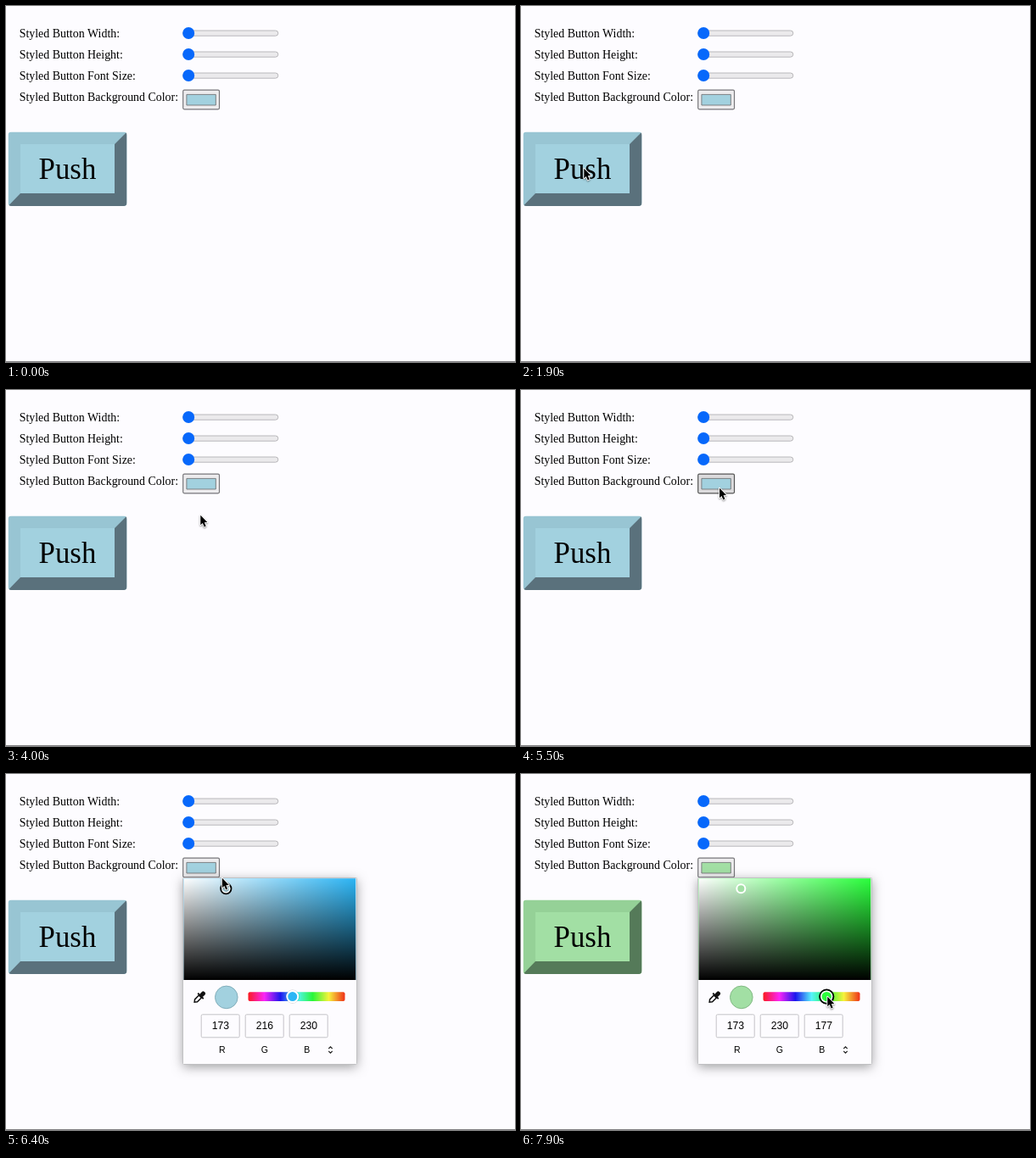
Recreate the animation shown at these times as an HTML page with a canvas. Size 600x420 px, loop 8000 ms.

```html
<!DOCTYPE html>
<html lang="en">
<head>
<meta charset="utf-8">
<title>Styled button</title>
<style>
  html, body { margin: 0; width: 100%; height: 100%; overflow: hidden; background: #fdfcff; }
  canvas { display: block; width: 600px; height: 420px; }
</style>
</head>
<body>
<canvas id="stage" width="600" height="420"></canvas>
<script>
const ctx = document.getElementById('stage').getContext('2d');
const LOOP = 8000, STEP = 100;
const APPEAR = 100, HOVER = 5000, OPEN = 5700, PICK = 7500;
const SERIF = '"Liberation Serif", "Times New Roman", serif';
const SANS = '"Liberation Sans", Arial, sans-serif';
const PAGE = '#fdfcff';

const BLUE = { fill: '#a2d1df', light: '#98c5d3', dark: '#5a717c', edge: '#83aebb',
               pure: '#2cb5f5', hue: 195, rgb: [173, 216, 230] };
const GREEN = { fill: '#a2dfa4', light: '#95d197', dark: '#557a59', edge: '#83b985',
                pure: '#2aff3c', hue: 124, rgb: [173, 230, 177] };

// Pointer tip: time, x, y
const PATH = [
  [100, 380, 185], [900, 92, 197], [1900, 73.5, 191], [3400, 73.5, 191],
  [4000, 228.5, 147], [4500, 229, 144], [5000, 233, 115], [6100, 233.5, 115],
  [6400, 254, 122], [7000, 363, 266], [7300, 360.5, 262], [8000, 360.5, 262]
];

function pointerAt(t) {
  let i = 1;
  while (i < PATH.length - 1 && t > PATH[i][0]) i++;
  const [t0, x0, y0] = PATH[i - 1], [t1, x1, y1] = PATH[i];
  const u = Math.min(1, Math.max(0, (t - t0) / (t1 - t0)));
  const e = u * u * (3 - 2 * u);
  return [x0 + (x1 - x0) * e, y0 + (y1 - y0) * e];
}

function paint(fill, stroke, width = 1) {
  if (fill) { ctx.fillStyle = fill; ctx.fill(); }
  if (stroke) { ctx.strokeStyle = stroke; ctx.lineWidth = width; ctx.stroke(); }
}

function box(x, y, w, h, r, fill, stroke, width) {
  ctx.beginPath();
  ctx.roundRect(x, y, w, h, r);
  paint(fill, stroke, width);
}

function circle(x, y, r, fill, stroke, width) {
  ctx.beginPath();
  ctx.arc(x, y, r, 0, Math.PI * 2);
  paint(fill, stroke, width);
}

function poly(points, fill, stroke, width, open) {
  ctx.beginPath();
  points.forEach(([x, y]) => ctx.lineTo(x, y));
  if (!open) ctx.closePath();
  paint(fill, stroke, width);
}

function text(str, x, y, size, family, align = 'left') {
  ctx.font = `${size}px ${family}`;
  ctx.textAlign = align;
  ctx.fillStyle = '#000';
  ctx.fillText(str, x, y);
}

function gradient(x0, y0, x1, y1, colors) {
  const g = ctx.createLinearGradient(x0, y0, x1, y1);
  colors.forEach((c, i) => g.addColorStop(i / (colors.length - 1), c));
  return g;
}

function drawForm(color, hover) {
  ['Width:', 'Height:', 'Font Size:', 'Background Color:'].forEach((label, i) => {
    text('Styled Button ' + label, 15.7, 36.8 + i * 25, 13.92, SERIF);
    if (i === 3) return;
    const y = 32 + i * 25;
    box(208.5, y - 3, 112.3, 6.2, 3.1, '#ebeaec', '#b3b2b5', 0.9);
    circle(215.2, y, 7, '#0768fb');
  });
  box(208.7, 99.2, 42.8, 22.6, 1.5, hover ? '#dcdbdd' : '#edecee', hover ? '#555' : '#77767a', 1.2);
  box(212.9, 104.4, 34.4, 12.6, 0, color.fill, '#727478', 0.9);
}

function drawButton(color) {
  const l = 2.5, t = 148.5, r = 142.5, b = 236, il = 17, it = 163, ir = 128, ib = 221;
  ctx.save();
  ctx.beginPath();
  ctx.roundRect(l, t, r - l, b - t, 4);
  ctx.clip();
  ctx.fillStyle = color.light;
  ctx.fillRect(l, t, r - l, b - t);
  poly([[r, t], [r, b], [l, b], [il, ib], [ir, ib], [ir, it]], color.dark);
  ctx.fillStyle = color.fill;
  ctx.fillRect(il, it, ir - il, ib - it);
  ctx.restore();
  text('Push', 38.6, 203.7, 34.8, SERIF);
}

function drawDropper() {
  ctx.save();
  ctx.translate(227.8, 263.6);
  ctx.rotate(Math.PI / 4);
  box(-2.5, -9, 5, 6.5, 2, '#111');
  box(-4.7, -3.4, 9.4, 2, 0.5, '#111');
  poly([[-2.1, -1.5], [-2.1, 5.3], [0, 8], [2.1, 5.3], [2.1, -1.5]], PAGE, '#111', 1.5);
  ctx.restore();
}

function drawPicker(color, hueFocused) {
  ctx.save();
  ctx.shadowColor = 'rgba(0,0,0,.38)';
  ctx.shadowBlur = 13;
  ctx.shadowOffsetY = 3;
  box(208.5, 122.5, 205, 220, 1, PAGE);
  ctx.restore();
  box(208.5, 122.5, 205, 220, 1, PAGE, '#bcbbbe', 0.9);

  const x = 209.5, y = 123.2, w = 202.8, h = 119.8;
  const layers = [
    color.pure,
    gradient(x, 0, x + w, 0, ['#fff', 'rgba(255,255,255,0)']),
    gradient(0, y, 0, y + h, ['rgba(0,0,0,0)', '#000'])
  ];
  for (const layer of layers) {
    ctx.fillStyle = layer;
    ctx.fillRect(x, y, w, h);
  }
  if (hueFocused) {
    circle(259.3, 135.2, 5, color.fill, '#fff', 2);
  } else {
    circle(259.3, 135.2, 6.1, color.fill, '#000', 2);
    circle(259.3, 135.2, 4.5, null, '#fff', 1.4);
  }

  drawDropper();
  circle(259.8, 263.4, 13.3, color.fill, color.edge, 1);

  box(285.5, 257.2, 114, 10.8, 2, gradient(285.5, 0, 399.5, 0,
    ['#fa1b20', '#fb25f6', '#1c16ee', '#57f4fb', '#28f63a', '#f6f23b', '#ef3018']));
  const hueX = 285.5 + 114 * (1 - color.hue / 360);
  if (hueFocused) {
    circle(hueX, 262.6, 8.1, color.pure, '#000', 2);
    circle(hueX, 262.6, 6.4, null, '#fff', 1.5);
  } else {
    circle(hueX, 262.6, 7.7, null, 'rgba(0,0,0,.15)', 1);
    circle(hueX, 262.6, 6.5, color.pure, '#fff', 2);
  }

  color.rgb.forEach((value, i) => {
    const left = 230.2 + i * 52;
    box(left, 283.8, 45, 27, 1.5, PAGE, '#c4c3c7', 1);
    text(value, left + 22.6, 301.4, 12.2, SANS, 'center');
    text('RGB'[i], 254.8 + i * 50, 329.3, 10.5, SANS, 'center');
  });
  poly([[380.3, 324], [382.5, 321.8], [384.7, 324]], null, '#222', 1.1, true);
  poly([[380.3, 327], [382.5, 329.2], [384.7, 327]], null, '#222', 1.1, true);
}

function drawPointer(x, y) {
  ctx.save();
  ctx.translate(x, y);
  ctx.lineJoin = 'round';
  ctx.shadowColor = 'rgba(0,0,0,.35)';
  ctx.shadowBlur = 2;
  ctx.shadowOffsetY = 1;
  const arrow = [[0.8, 0.8], [0.8, 12.2], [3.3, 9.9], [5.2, 14.4], [7.2, 13.5], [5.3, 9.2], [8.8, 9]];
  poly(arrow, '#fff', '#fff', 1.9);
  ctx.shadowColor = 'transparent';
  poly(arrow, '#000');
  ctx.restore();
}

function draw(t) {
  const picked = t >= PICK, open = t >= OPEN;
  const color = picked ? GREEN : BLUE;
  ctx.fillStyle = PAGE;
  ctx.fillRect(0, 0, 600, 420);
  ctx.fillStyle = '#828184';
  ctx.fillRect(0, 419, 600, 1);
  drawForm(color, t >= HOVER && !open);
  drawButton(color);
  if (open) drawPicker(color, picked);
  if (t >= APPEAR) drawPointer(...pointerAt(t));
}

const start = performance.now();
function tick() {
  const t = (performance.now() - start) % LOOP;
  draw(Math.floor(t / STEP) * STEP);
  requestAnimationFrame(tick);
}
tick();
</script>
</body>
</html>
```
